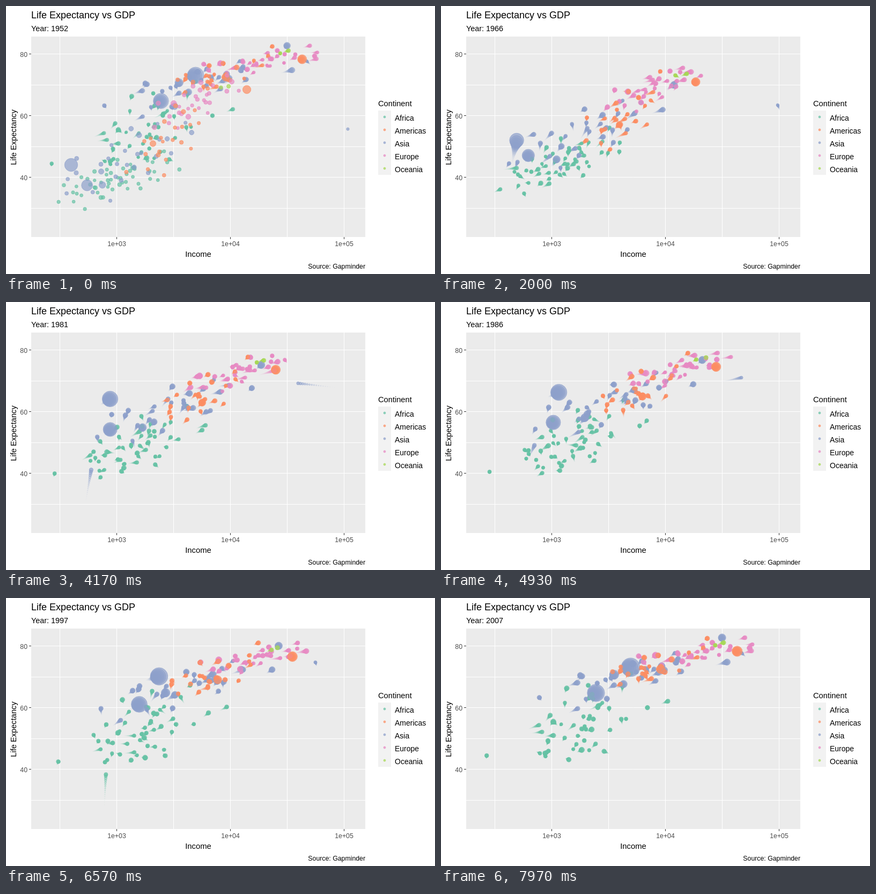
Recreate the animation shown at these times as an HTML page with a canvas. Size 800 by 500 pixels, loop 10 s.

```html
<!DOCTYPE html>
<html lang="en">
<head>
<meta charset="utf-8">
<title>Life Expectancy vs GDP</title>
<style>
html, body { margin: 0; width: 100%; height: 100%; overflow: hidden; background: #fff; }
canvas { display: block; width: 800px; height: 500px; }
</style>
</head>
<body>
<canvas id="chart" width="800" height="500"></canvas>
<script>
const ctx = document.getElementById('chart').getContext('2d');
const FRAMES = 240, LOOP = 10000, WAKE = 24, ALPHA = 0.7, STROKE = 0.945;
const LAST = 11; // five-year steps from 1952 to 2007
const PANEL = { x: 47, y: 57, w: 623, h: 374 };
const FONT = '"Liberation Sans", Arial, sans-serif';
const COLOURS = {
  Africa: '#66c2a5', Americas: '#fc8d62', Asia: '#8da0cb', Europe: '#e78ac3', Oceania: '#a6d854'
};

// Every pair is a value in 1952 and in 2007. Income is log10, population in millions.
const CROWDS = [
  { name: 'Africa', n: 51, gdp: [2.99, 3.26], life: [39.1, 54.8], pop: [2.7, 9], spread: 0.3, lifeSd: [4.8, 9] },
  { name: 'Asia', n: 27, gdp: [3.1, 3.76], life: [46.5, 71], pop: [6, 18], spread: 0.36, lifeSd: [8.5, 5.5] },
  { name: 'Europe', n: 30, gdp: [3.68, 4.33], life: [64.5, 77.6], pop: [7, 10], spread: 0.23, lifeSd: [5.6, 2.7] },
  { name: 'Oceania', n: 2, gdp: [4.01, 4.45], life: [69.2, 80.5], pop: [4, 9], spread: 0.05, lifeSd: [0.2, 0.6] },
  { name: 'Americas', n: 23, gdp: [3.47, 3.93], life: [53, 73.6], pop: [4, 11], spread: 0.21, lifeSd: [8.5, 4] }
];

// Bend holds the easing powers of income and life; shock is [step, income, life].
const LEADS = [
  { name: 'Asia', gdp: [2.6, 3.695], life: [44, 73], pop: [556, 1319], bend: [1.8, 0.55], shock: [2, 0, -11] },
  { name: 'Asia', gdp: [2.74, 3.39], life: [37.4, 64.7], pop: [372, 1110], bend: [1.8, 0.75] },
  { name: 'Asia', gdp: [2.875, 3.55], life: [37.5, 70.6], pop: [82, 223], bend: [1, 1] },
  { name: 'Asia', gdp: [3.51, 4.5], life: [63, 82.6], pop: [86, 127], bend: [0.4, 0.75] },
  { name: 'Asia', gdp: [5.035, 4.675], life: [55.6, 77.6], pop: [0.2, 2.5], bend: [1.5, 0.75], shock: [6, -0.4, 0] },
  { name: 'Asia', gdp: [2.57, 3.23], life: [39.4, 59.7], pop: [5, 14], bend: [1.8, 1], shock: [5, 0, -17.5] },
  { name: 'Africa', gdp: [2.69, 2.94], life: [40, 46.2], pop: [2.5, 9], bend: [0.75, 0.75], shock: [8, 0, -21] },
  { name: 'Americas', gdp: [3.32, 3.96], life: [50.9, 72.4], pop: [57, 190], bend: [0.6, 0.9] },
  { name: 'Americas', gdp: [4.146, 4.633], life: [68.4, 78.2], pop: [157, 301], bend: [1, 1] }
];

let seed = 1952;
function random() {
  seed = (seed + 0x6d2b79f5) | 0;
  let v = Math.imul(seed ^ (seed >>> 15), 1 | seed);
  v = (v + Math.imul(v ^ (v >>> 7), 61 | v)) ^ v;
  return ((v ^ (v >>> 14)) >>> 0) / 4294967296;
}
// Normal quantile with the far tails cut off.
function quantile(share) {
  const p = 0.04 + 0.92 * share;
  return Math.log(p / (1 - p)) / 1.75;
}
const normal = () => quantile(random());
const mix = (a, b, u) => a + (b - a) * u;
const clamp = (v, lo, hi) => Math.max(lo, Math.min(hi, v));
const toX = log => PANEL.x + (log - 2.2485) * 211.9;
const toY = life => PANEL.y + (85.55 - life) * 5.763;
const pointSize = pop => 2 + 14 * Math.sqrt(pop / 1319);

// offset(u) returns what to add to the eased income and life.
function makePath({ name, gdp, life, pop, bend }, offset) {
  const path = { colour: COLOURS[name], x: [], y: [], size: [] };
  for (let s = 0; s <= LAST; s++) {
    const u = s / LAST, [dg, dl] = offset(u, s);
    path.x.push(toX(mix(...gdp, u ** bend[0]) + dg));
    path.y.push(toY(Math.min(mix(...life, u ** bend[1]) + dl, mix(73, 82.6, u))));
    path.size.push(pointSize(pop[0] * (pop[1] / pop[0]) ** u));
  }
  return path;
}

// A shock strikes at one step and fades over the next ones.
function leadPath(lead) {
  const [at, dg, dl] = lead.shock || [0, 0, 0];
  return makePath(lead, (u, s) => {
    const force = s < at ? 0 : 0.35 ** (s - at);
    return [dg * force, dl * force];
  });
}

function crowdPath(g, i) {
  const rich = quantile((i + 0.5) / g.n);
  const fit = quantile((i * 0.618034 + 0.3) % 1);
  const driftG = normal(), driftL = normal();
  const scale = Math.exp(1.1 * normal());
  const country = { ...g, pop: g.pop.map(p => p * scale), bend: [0.75, 0.75] };
  return makePath(country, u => {
    const zg = mix(rich, 0.9 * rich + 0.4 * driftG, u);
    const zf = mix(fit, 0.8 * fit + 0.6 * driftL, u);
    const zl = 0.7 * zg + 0.7 * zf;
    const sd = mix(...g.lifeSd, u);
    return [
      Math.min(g.spread * (1 + 0.3 * u) * zg, 0.85) + 0.04 * normal(),
      sd * (zl + 0.08 * normal())
    ];
  });
}

const paths = CROWDS.flatMap(g => [
  ...LEADS.filter(lead => lead.name === g.name).map(leadPath),
  ...Array.from({ length: g.n }, (_, i) => crowdPath(g, i))
]);

function dot(x, y, size, colour) {
  ctx.fillStyle = ctx.strokeStyle = colour;
  ctx.beginPath();
  ctx.arc(x, y, 0.375 * (size * 2.845 + STROKE), 0, 2 * Math.PI);
  ctx.fill();
  ctx.stroke();
}

function text(str, x, y, size, align = 'left', colour = '#000') {
  ctx.font = size + 'px ' + FONT;
  ctx.textAlign = align;
  ctx.fillStyle = colour;
  ctx.fillText(str, x, y);
}

function line(x1, y1, x2, y2, colour) {
  ctx.strokeStyle = colour;
  ctx.lineWidth = 1;
  ctx.beginPath();
  ctx.moveTo(x1, y1);
  ctx.lineTo(x2, y2);
  ctx.stroke();
}

function drawPanel() {
  const { x, y, w, h } = PANEL;
  const snap = v => Math.round(v - 0.1) + 0.5;
  ctx.fillStyle = '#ebebeb';
  ctx.fillRect(x, y, w, h);
  for (let log = 2.5; log <= 5; log += 0.5) {
    const gx = snap(toX(log));
    line(gx, y, gx, y + h, '#fff');
    if (log % 1) continue;
    line(gx, y + h, gx, y + h + 4, '#333');
    text('1e+0' + log, gx, 448, 12.3, 'center', '#4d4d4d');
  }
  for (let life = 30; life <= 80; life += 10) {
    const gy = snap(toY(life));
    line(x, gy, x + w, gy, '#fff');
    if (life % 20) continue;
    line(x - 4, gy, x, gy, '#333');
    text(life, 40, gy + 5, 12.3, 'right', '#4d4d4d');
  }
}

function drawLabels(year) {
  text('Life Expectancy vs GDP', 47, 23, 18);
  text('Year: ' + year, 47, 47, 14.4);
  text('Income', 358.5, 468, 14.8, 'center');
  text('Source: Gapminder', 670, 490, 12.3, 'right');
  ctx.save();
  ctx.translate(19, 245);
  ctx.rotate(-Math.PI / 2);
  text('Life Expectancy', 0, 0, 14.67, 'center');
  ctx.restore();
}

function drawLegend() {
  text('Continent', 694, 187, 14.67);
  ctx.fillStyle = '#f2f2f2';
  ctx.fillRect(694, 195, 24, 120);
  ctx.lineWidth = STROKE;
  Object.keys(COLOURS).forEach((name, i) => {
    const y = 207 + 24 * i;
    ctx.globalAlpha = ALPHA;
    dot(706, y, 1.5, COLOURS[name]);
    ctx.globalAlpha = 1;
    text(name, 725, y + 7, 14);
  });
}

// The wake wraps round the loop, so the opening shows the fading end.
function drawPoints(frame) {
  ctx.lineWidth = STROKE;
  for (let age = WAKE - 1; age >= 0; age--) {
    const fade = (1 - age / WAKE) ** 3;
    const pos = ((frame - age + FRAMES) % FRAMES) / (FRAMES - 1) * LAST;
    const s = Math.min(LAST - 1, Math.floor(pos));
    const at = values => mix(values[s], values[s + 1], pos - s);
    ctx.globalAlpha = ALPHA * fade;
    for (const p of paths) dot(at(p.x), at(p.y), at(p.size) * fade, p.colour);
  }
  ctx.globalAlpha = 1;
}

let shown = -1;
function render() {
  // Frames run at 30 per second on a 10 ms clock; the last one is held.
  const tick = 10 * Math.floor((performance.now() % LOOP) / 10);
  const frame = Math.min(FRAMES - 1, Math.floor((tick + 5) * 0.03));
  if (frame !== shown) {
    shown = frame;
    ctx.fillStyle = '#fff';
    ctx.fillRect(0, 0, 800, 500);
    drawPanel();
    drawPoints(frame);
    drawLabels(Math.round(1952 + 55 * frame / (FRAMES - 1)));
    drawLegend();
  }
  requestAnimationFrame(render);
}
render();
</script>
</body>
</html>
```
